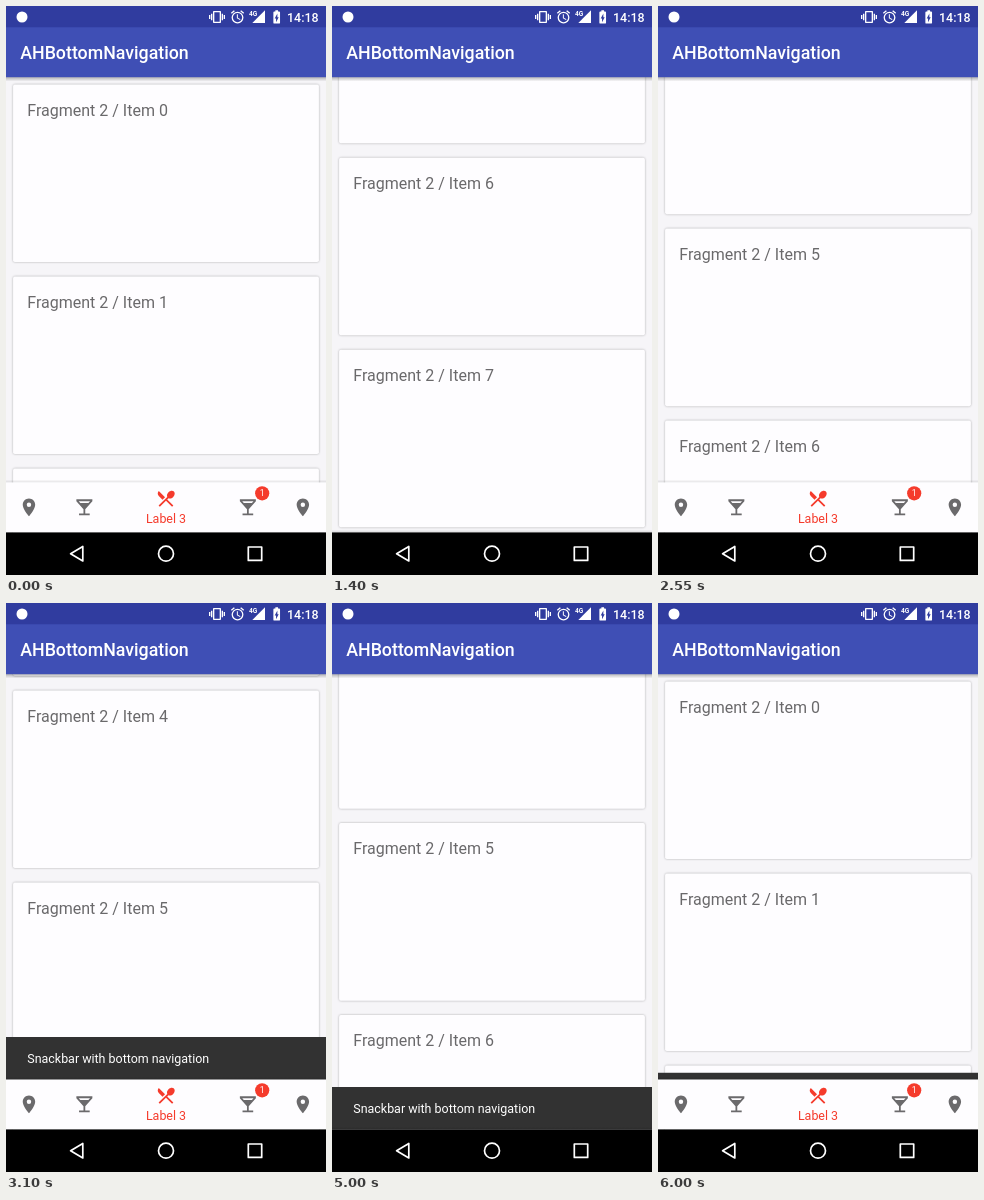
Animation of 320x569 px, one loop 6050 ms. Source, as an HTML page:

```html
<!DOCTYPE html>
<html lang="en">
<head>
<meta charset="utf-8">
<title>Bottom navigation</title>
<style>
  html, body { margin: 0; width: 100%; height: 100%; overflow: hidden; background: #f6f5f8; }
  svg { display: block; width: 100%; height: 100%; font-family: Roboto, sans-serif; }
  .card { fill: #fefdff; filter: drop-shadow(0 .9px .9px rgba(0, 0, 0, .3)); }
  .item { font-size: 16px; fill: #6a696b; }
  .small { font-size: 12.44px; }
  .white { fill: #fff; }
  .grey { fill: #6b6a6c; }
  .red { fill: #f53b2c; }
  .outline { fill: none; stroke: #fff; stroke-width: 1.7; stroke-linejoin: round; }
</style>
</head>
<body>
<svg viewBox="0 0 320 569">
  <defs>
    <linearGradient id="shade" x2="0" y2="1">
      <stop stop-opacity=".28"/>
      <stop offset="1" stop-opacity="0"/>
    </linearGradient>
    <path id="pin" d="M12 2C8.13 2 5 5.13 5 9c0 5.25 7 13 7 13s7-7.75 7-13c0-3.87-3.13-7-7-7zm0 9.5a2.5 2.5 0 1 1 0-5 2.5 2.5 0 0 1 0 5z"/>
    <path id="glass" d="M21 5V3H3v2l8 9v5H6v2h12v-2h-5v-5l8-9zM7.43 7L5.66 5h12.69l-1.78 2H7.43z"/>
    <path id="cutlery" d="M8.1 13.34l2.83-2.83L3.91 3.5c-1.56 1.56-1.56 4.09 0 5.66l4.19 4.18zm6.78-1.81c1.53.71 3.68.21 5.27-1.38 1.91-1.91 2.28-4.65.81-6.12-1.46-1.46-4.2-1.1-6.12.81-1.59 1.59-2.09 3.74-1.38 5.27L3.7 19.87l1.41 1.41L12 14.41l6.88 6.88 1.41-1.41L13.41 13l1.47-1.47z"/>
  </defs>

  <rect width="320" height="569" fill="#f6f5f8"/>
  <g id="list"></g>

  <g id="snackbar">
    <rect y="434" width="320" height="43" fill="#323232"/>
    <text class="small white" x="21.3" y="460.3">Snackbar with bottom navigation</text>
  </g>

  <g id="nav">
    <rect width="320" height="3" fill="url(#shade)" opacity=".4" transform="matrix(1 0 0 -1 0 476.5)"/>
    <rect y="476.5" width="320" height="50" fill="#fefdff"/>
    <g class="grey">
      <use href="#pin" transform="translate(12.3 490.7) scale(.889)"/>
      <use href="#glass" transform="translate(67.7 490.7) scale(.889)"/>
      <use href="#glass" transform="translate(231.2 490.7) scale(.889)"/>
      <use href="#pin" transform="translate(286.2 490.7) scale(.889)"/>
    </g>
    <g class="red">
      <use href="#cutlery" transform="translate(149.3 481.9) scale(.889)"/>
      <text class="small" x="160" y="516.6" text-anchor="middle">Label 3</text>
      <circle cx="256.2" cy="487.3" r="7.1"/>
    </g>
    <text class="white" x="256.2" y="490.3" font-size="8.5" text-anchor="middle">1</text>
  </g>

  <g id="toolbar">
    <rect y="71" width="320" height="4.5" fill="url(#shade)"/>
    <rect width="320" height="71.2" fill="#3f4fb5"/>
    <rect width="320" height="21.3" fill="#303c9f"/>
    <text class="white" x="14.2" y="53.2" font-size="17.78" font-weight="500">AHBottomNavigation</text>
  </g>

  <g id="status" class="white">
    <circle cx="16" cy="11" r="5.5"/>
    <path transform="translate(203 3) scale(.667)" d="M0 15h2V9H0v6zm3 2h2V7H3v10zm19-8v6h2V9h-2zm-3 8h2V7h-2v10zM16.5 3h-9C6.67 3 6 3.67 6 4.5v15c0 .83.67 1.5 1.5 1.5h9c.83 0 1.5-.67 1.5-1.5v-15c0-.83-.67-1.5-1.5-1.5zM16 19H8V5h8v14z"/>
    <path transform="translate(223.6 3) scale(.66)" d="M22 5.72l-4.6-3.86-1.29 1.53 4.6 3.86L22 5.72zM7.88 3.39L6.6 1.86 2 5.71l1.29 1.53 4.59-3.85zM12.5 8H11v6l4.75 2.85.75-1.23-4-2.37V8zM12 4a9 9 0 1 0 0 18 9 9 0 0 0 0-18zm0 16a7 7 0 1 1 0-14 7 7 0 0 1 0 14z"/>
    <text x="243" y="10" font-size="6.6" font-weight="700">4G</text>
    <path d="M259 4.3V17H246.3z"/>
    <path transform="translate(262.7 2.9) scale(.667)" d="M15.67 4H14V2h-4v2H8.33C7.6 4 7 4.6 7 5.33v15.33C7 21.4 7.6 22 8.33 22h7.33c.74 0 1.34-.6 1.34-1.33V5.33C17 4.6 16.4 4 15.67 4zM11 20v-5.5H9L13 7v5.5h2L11 20z"/>
    <text class="small" x="281" y="15.6" font-weight="500">14:18</text>
  </g>

  <g id="system">
    <rect y="526.4" width="320" height="43"/>
    <path class="outline" d="M64.6 547.7L76.8 540.4V555z"/>
    <circle class="outline" cx="160" cy="547.7" r="7.5"/>
    <rect class="outline" x="242.3" y="541" width="13.4" height="13.4"/>
  </g>
</svg>

<script>
const LOOP = 6050, STEP = 50, PITCH = 192;
const NAV_HEIGHT = 50, SNACK_HEIGHT = 42.5;
const $ = id => document.getElementById(id);

function bezier(x1, y1, x2, y2) {
  const at = (a, b, s) => 3 * (1 - s) * (1 - s) * s * a + 3 * (1 - s) * s * s * b + s ** 3;
  return x => {
    let low = 0, high = 1;
    for (let i = 0; i < 24; i++) {
      const mid = (low + high) / 2;
      if (at(x1, x2, mid) < x) low = mid; else high = mid;
    }
    return at(y1, y2, low);
  };
}

const fling = bezier(.15, 0, .3, 1);
const quickFling = bezier(.1, .04, .15, 1);
const flingToTop = bezier(.3, 0, .7, .8);
const decelerate = bezier(0, 0, .2, 1);
const standard = bezier(.4, 0, .2, 1);

// Each move: start ms, end ms, value reached, easing.
const scrollMoves = [
  [435, 1750, 1141, fling],
  [1863, 3050, 759, fling],
  [3970, 4625, 556, fling],
  [4625, 5400, 869, quickFling],
  [5530, 5970, 0, flingToTop]
];
const navMoves = [
  [435, 735, NAV_HEIGHT, decelerate],
  [1871, 2171, 0, decelerate],
  [4625, 4925, NAV_HEIGHT, decelerate],
  [5530, 5830, 0, decelerate]
];
const snackMoves = [
  [2850, 3100, 0, standard],
  [5860, 6110, SNACK_HEIGHT, standard]
];

function valueAt(moves, initial, time) {
  let value = initial;
  for (const [start, end, target, ease] of moves) {
    if (time <= start) break;
    value += (target - value) * ease(Math.min(1, (time - start) / (end - start)));
  }
  return value;
}

const moveY = (id, y) => $(id).setAttribute("transform", `translate(0 ${y.toFixed(2)})`);

$("list").innerHTML = Array.from({ length: 10 }, (_, i) => `
  <g transform="translate(0 ${i * PITCH})">
    <rect class="card" x="7.1" y="78.4" width="305.8" height="177.6" rx="1.8"/>
    <text class="item" x="21.3" y="109.7">Fragment 2 / Item ${i}</text>
  </g>`).join("");

function draw(now) {
  const time = Math.floor(now % LOOP / STEP) * STEP;
  const navOffset = valueAt(navMoves, 0, time);
  moveY("list", -valueAt(scrollMoves, 0, time));
  moveY("nav", navOffset);
  moveY("snackbar", navOffset + valueAt(snackMoves, SNACK_HEIGHT, time));
  $("snackbar").style.display = time > 2850 ? "" : "none";
  requestAnimationFrame(() => draw(performance.now() - origin));
}

const origin = performance.now();
draw(0);
</script>
</body>
</html>
```
